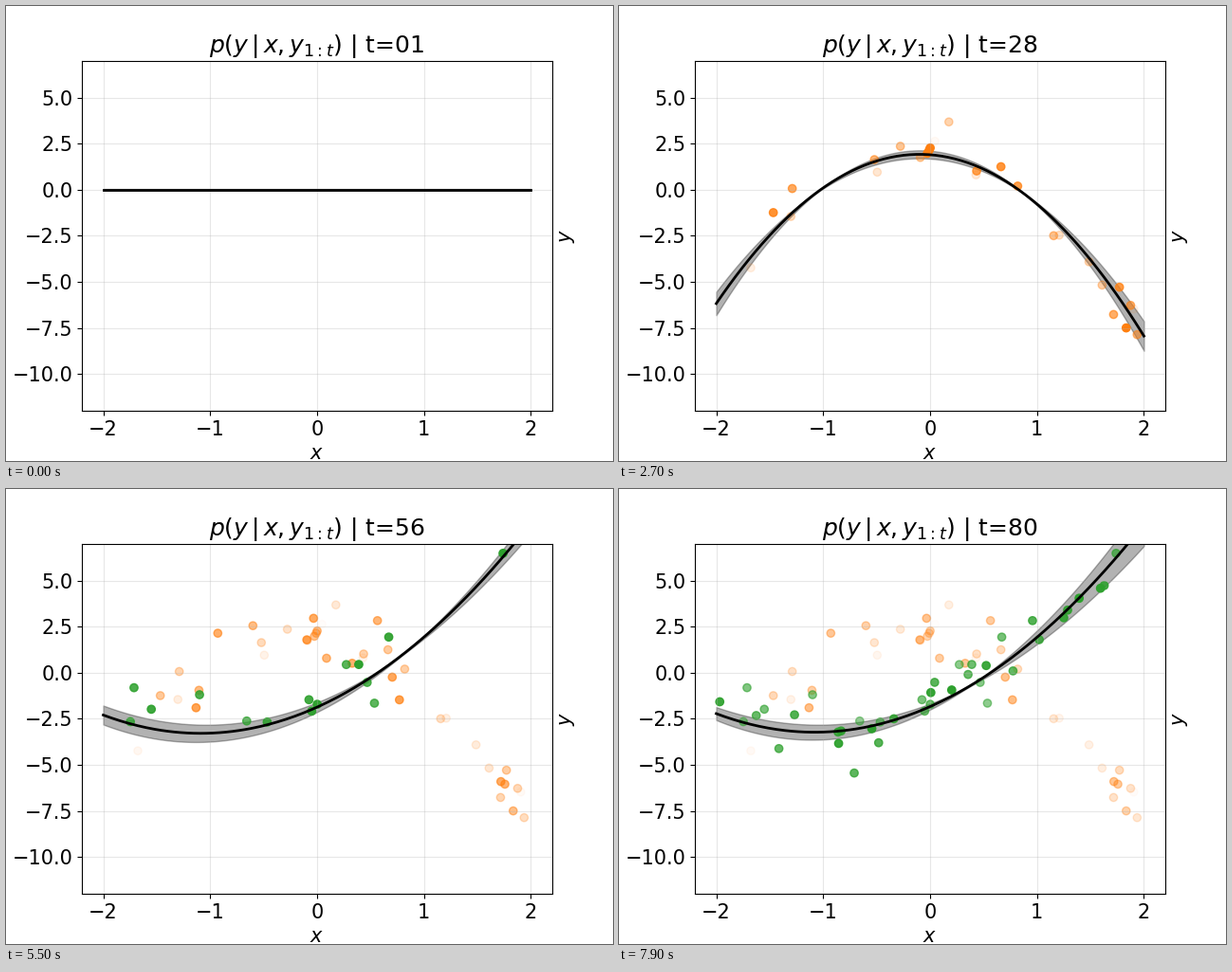
Recreate the animation shown at these times as a matplotlib script. Size 640 px wide and 480 px high, loop 8 s.

```python
import numpy as np
import matplotlib.pyplot as plt
from matplotlib.animation import FuncAnimation
from matplotlib.colors import to_rgba

STEPS = 80
CHANGE = 41    # first observation of the second regime
NOISE = 0.9
SETTLE = 1.5   # steps the first fit takes to leave the prior

# Key curves per regime: step -> coefficients (1, x, x^2) of mean and spread
FIRST = {
    9: ((1.90, -0.50, -2.275), (0.128, -0.025, -0.14)),
    18: ((1.80, -0.38, -2.19), (0.174, -0.034, -0.19)),
    35: ((1.98, -0.495, -2.28), (0.247, -0.049, -0.27)),
}
SECOND = {
    45: ((-2.38, 2.48, 1.32), (0.33, -0.23, -0.06)),
    64: ((-1.41, 2.72, 1.085), (0.20, -0.30, -0.08)),
    79: ((-1.84, 2.57, 1.19), (0.16, -0.385, -0.145)),
}


def basis(x):
    return np.vander(x, 3, increasing=True)


def coefs(k):
    """Mean and spread coefficients after observation k."""
    keys = FIRST if k <= CHANGE else SECOND
    rows = np.array(list(keys.values())).reshape(len(keys), 6)
    flat = [np.interp(k, list(keys), col) for col in rows.T]
    return (1 - np.exp(-k / SETTLE)) * np.reshape(flat, (2, 3))


def observe(rng, count, truth):
    x = rng.uniform(-2, 2, count)
    return np.column_stack([x, basis(x) @ truth + rng.normal(0, NOISE, count)])


rng = np.random.default_rng(4)
data = np.vstack([observe(rng, CHANGE, FIRST[35][0]),
                  observe(rng, STEPS - CHANGE, SECOND[79][0])])
colors = np.array([to_rgba("tab:orange" if i < CHANGE else "tab:green")
                   for i in range(STEPS)])

plt.rcParams["font.size"] = 15
fig, ax = plt.subplots(figsize=(6.4, 4.8), dpi=100)
ax.set(xlim=(-2.2, 2.2), ylim=(-12, 7), xlabel="$x$", ylabel="$y$")
ax.yaxis.set_label_position("right")
ax.grid(alpha=0.3)

xs = np.linspace(-2, 2, 200)
X = basis(xs)
line, = ax.plot(xs, 0 * xs, color="black", lw=2)
dots = ax.scatter([], [], zorder=1.1)
band = None


def update(k):
    global band
    mean, spread = coefs(k) @ X.T
    half = np.hypot(spread, 0.03)
    if band is not None:
        band.remove()
    band = ax.fill_between(xs, mean - half, mean + half,
                           color="black", alpha=0.3, zorder=1)
    line.set_ydata(mean)

    # Older observations fade linearly
    rgba = colors[:k + 1].copy()
    rgba[:, 3] = np.linspace(0, 1, k + 1)
    dots.set_offsets(data[:k + 1])
    dots.set_facecolor(rgba)
    dots.set_edgecolor("face")
    ax.set_title(rf"$p(y \,\vert\, x, y_{{1:t}})$ | t={k + 1:02d}")
    return line, dots, band


anim = FuncAnimation(fig, update, frames=STEPS, interval=100,
                     repeat=True, repeat_delay=0, blit=False)
plt.show()
```
